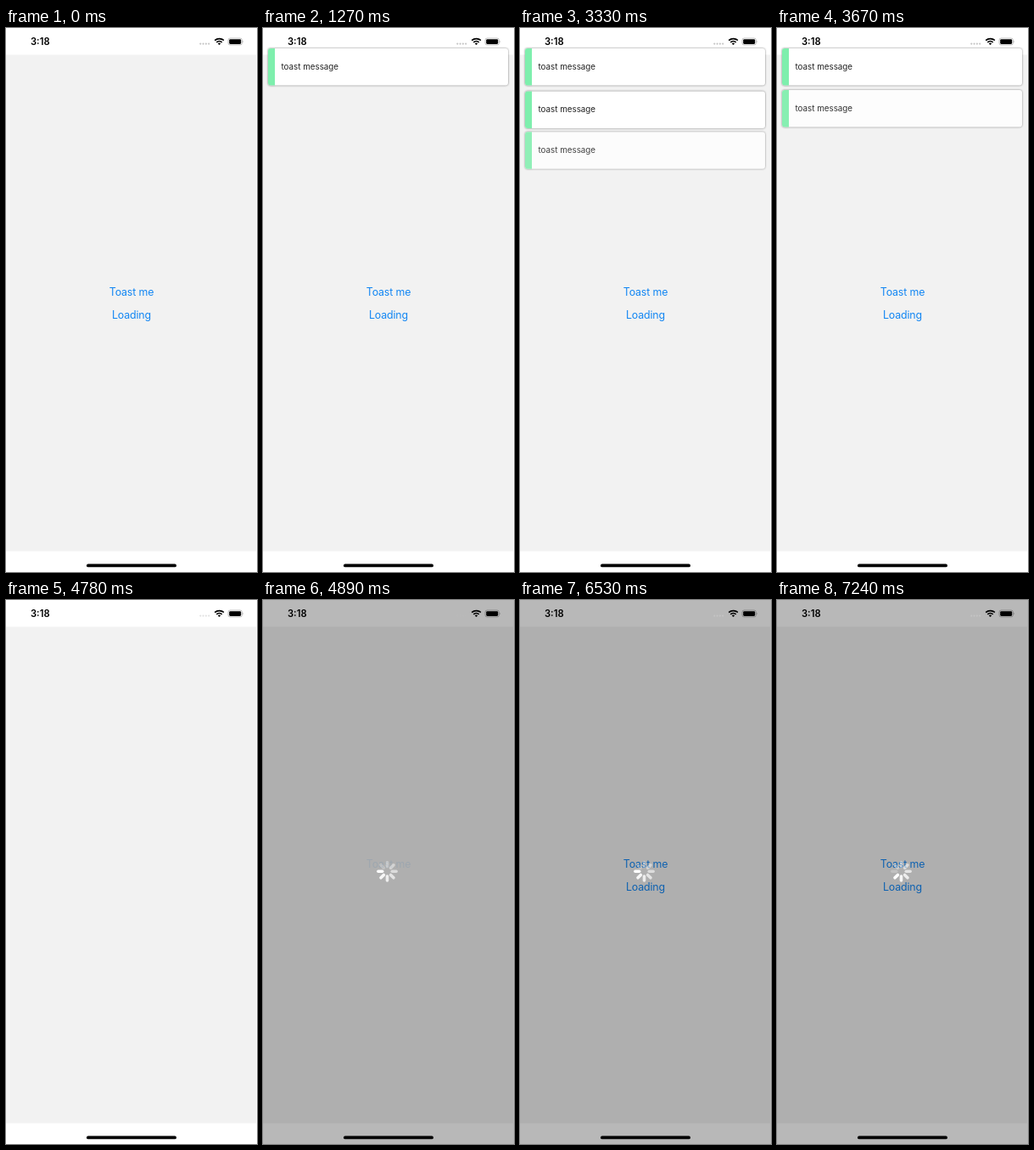
Animation of 296x640 px, one loop 7.33 s. Source, as an HTML page:

```html
<!DOCTYPE html>
<html lang="en">
<head>
<meta charset="utf-8">
<title>Toasts and loading</title>
<style>
  html, body { margin: 0; width: 100%; height: 100%; overflow: hidden; background: #fff; }
  svg { display: block; font-family: Inter, Roboto, sans-serif; }
  .link { font-size: 12.4px; letter-spacing: -.15px; text-anchor: middle; fill: #1286f3; }
  .toast { filter: drop-shadow(0 .6px 1.2px rgba(0, 0, 0, .5)); }
</style>
</head>
<body>
<svg width="296" height="640" viewBox="0 0 296 640">
  <rect width="296" height="640" fill="#fff"/>
  <rect y="31.5" width="295" height="584" fill="#f2f2f2"/>
  <text class="link" x="148" y="314.5">Toast me</text>
  <text class="link" x="148" y="341.5">Loading</text>
  <g id="toasts"></g>
  <rect id="dim" width="296" height="640" fill="#000" opacity=".28"/>
  <g id="spinner" transform="translate(146.5 319.3)" stroke="#fff" stroke-width="3.6" stroke-linecap="round"></g>

  <text x="29" y="20" font-size="11.2" font-weight="600">3:18</text>
  <g id="dots" fill="#c4c4c4">
    <circle cx="229.3" cy="18.6" r="1.1"/><circle cx="232.6" cy="18.6" r="1.1"/>
    <circle cx="235.9" cy="18.6" r="1.1"/><circle cx="239.2" cy="18.6" r="1.1"/>
  </g>
  <g fill="none" stroke="#000" stroke-width="1.7">
    <path d="M246.2 14.7a7.6 7.6 0 0 1 10.6 0M248.3 16.9a4.6 4.6 0 0 1 6.4 0"/>
    <path d="M249.8 18.2L251.5 20L253.2 18.2Q251.5 16.9 249.8 18.2Z" fill="#000" stroke="none"/>
  </g>
  <rect x="262" y="12" width="16.4" height="8" rx="2.4" fill="none" stroke="#000" stroke-opacity=".3" stroke-width=".8"/>
  <path d="M279.4 14.8q1.4 1.2 0 2.4z" opacity=".35"/>
  <rect x="263.2" y="13.2" width="14" height="5.7" rx="1.4"/>
  <rect x="95" y="630.5" width="106" height="3.8" rx="1.9"/>
</svg>
<script>
const LOOP = 7330, FADE = 250, LIFE = 2350, PITCH = 50.4;
const opened = [910, 1250, 1440];
const DIM_AT = 4890, SPOKE_TIME = 102;

// Bursts of redraws: first time, last time, intervals between.
const bursts = [
  [0, 0, 0], [950, 1600, 6], [1700, 1800, 1], [3330, 3970, 6], [4070, 4070, 0],
  [4780, 5430, 6], [5530, 5650, 1], [5790, 6000, 2], [6150, 6270, 1],
  [6410, 6530, 1], [6670, 6990, 3], [7130, 7240, 1]
];

const $ = id => document.getElementById(id);
const clamp = x => Math.max(0, Math.min(1, x));
const ease = x => x < .5 ? 2 * x * x : 1 - 2 * (1 - x) ** 2;
const fade = (t, start) => ease(clamp((t - start) / FADE));

$('toasts').innerHTML = opened.map(() => `<g class="toast">
  <rect x="6" width="283" height="43.5" rx="3" fill="#fff"/>
  <path d="M14 0H9Q6 0 6 3V40.5Q6 43.5 9 43.5H14Z" fill="#7eefad"/>
  <text x="21.5" y="25" font-size="9.8" fill="#222">toast message</text></g>`).join('');
$('spinner').innerHTML = Array.from({ length: 8 }, (_, i) =>
  `<path d="M-5.8 0H-10.6" transform="rotate(${i * 45})"/>`).join('');

const toasts = [...$('toasts').children];
const spokes = [...$('spinner').children];
const links = document.querySelectorAll('.link');

function hold(t) {
  const [first, last, n] = bursts.findLast(b => b[0] <= t);
  if (!n) return first;
  const step = (last - first) / n;
  return first + Math.min(n, Math.floor((t - first) / step + 1e-6)) * step;
}

function draw(time) {
  const t = hold(time);

  // The newest toast sits on top and pushes the older ones down.
  toasts.forEach((toast, i) => {
    const shown = fade(t, opened[i]) - fade(t, opened[i] + LIFE);
    const newer = opened.filter((start, j) => j > i && t >= start).length;
    toast.setAttribute('transform', `translate(0 ${8 + 16 * shown + PITCH * newer})`);
    toast.setAttribute('opacity', shown);
  });

  const loading = t >= DIM_AT - 5;
  $('dim').style.display = $('spinner').style.display = loading ? '' : 'none';
  const back = clamp((t - 4780) / 330);
  links.forEach((link, i) => {
    link.setAttribute('opacity', t < 4780 ? 1 : i ? clamp(back * 1.5 - .5) : back * back);
  });
  $('dots').setAttribute('opacity', t < 4780 ? 1 : loading ? back * back : .5);

  const head = Math.floor((t - DIM_AT) / SPOKE_TIME + .05);
  spokes.forEach((spoke, i) => {
    const age = ((head - i) % 8 + 8) % 8;
    spoke.setAttribute('opacity', 1 - .11 * age);
  });
}

const began = performance.now();
(function tick() {
  draw((performance.now() - began) % LOOP);
  requestAnimationFrame(tick);
})();
</script>
</body>
</html>
```
